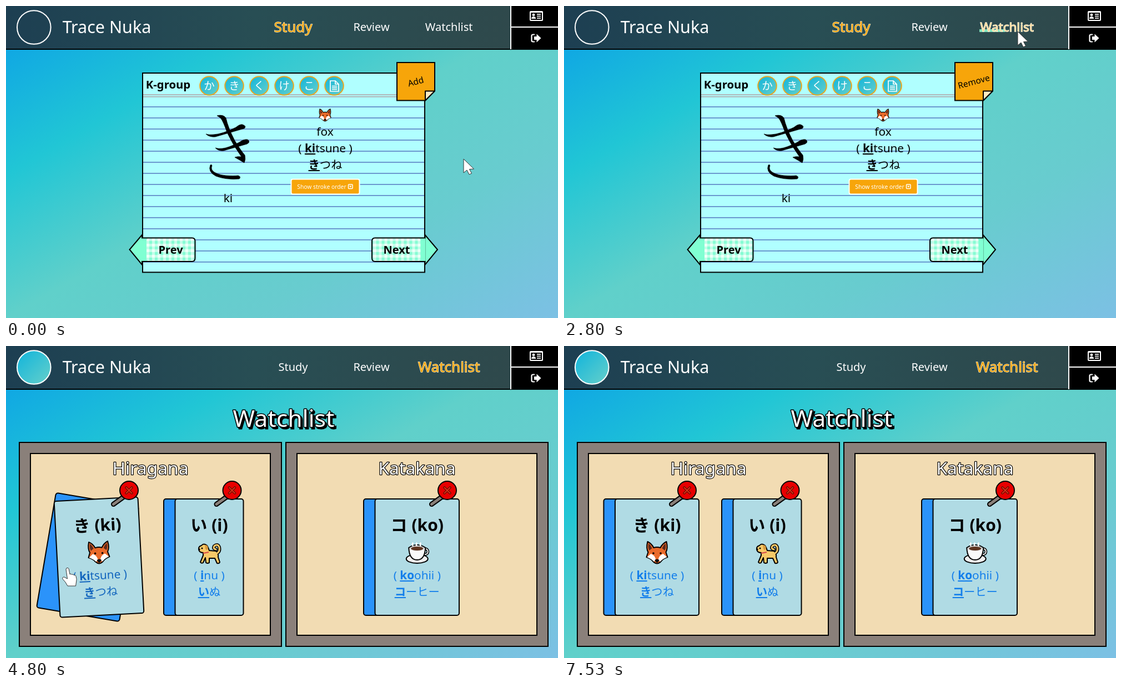
An HTML page that plays this animation: 994x563 px, repeating every 7590 ms.

```html
<!DOCTYPE html>
<html lang="en">
<head>
<meta charset="utf-8">
<title>Kana study cards</title>
<style>
  html, body { margin: 0; width: 100%; height: 100%; overflow: hidden; background: #22c6d6; }
  svg { display: block; width: 100vw; height: 100vh; }
  text { font-family: "Noto Sans", "Noto Sans CJK JP", "Noto Sans CJK", sans-serif; text-anchor: middle; }
  .b { font-weight: 700; }
  .u { font-weight: 700; text-decoration: underline; }
  .ink { stroke: #000; stroke-width: 2; }
  .outlined { fill: #fff; stroke: #000; paint-order: stroke; stroke-linejoin: round; }
</style>
</head>
<body>
<svg id="stage" viewBox="0 0 994 563" preserveAspectRatio="none"></svg>
<script>
const LOOP = 7590;
const ORANGE = '#f7a50a';

const text = (x, y, size, str, attrs = 'fill="#000"') =>
  `<text x="${x}" y="${y}" font-size="${size}" ${attrs}>${str}</text>`;
const box = (x, y, w, h, fill, attrs = '') =>
  `<rect x="${x}" y="${y}" width="${w}" height="${h}" fill="${fill}" ${attrs}/>`;
const shape = (d, fill, attrs = '') => `<path d="${d}" fill="${fill}" ${attrs}/>`;
const at = (x, y, content, extra = '') => `<g transform="translate(${x} ${y}) ${extra}">${content}</g>`;
const mirror = content => content + `<g transform="scale(-1 1)">${content}</g>`;

const defs = `<defs>
  <linearGradient id="sky" x1="0" y1="0" x2="1" y2="1">
    <stop offset="0" stop-color="#0ea0e8"/><stop offset=".07" stop-color="#10a8e3"/>
    <stop offset=".27" stop-color="#21c6d5"/><stop offset=".5" stop-color="#60d0ca"/>
    <stop offset=".72" stop-color="#68cccf"/><stop offset="1" stop-color="#7cc0e4"/>
  </linearGradient>
  <linearGradient id="bar"><stop offset="0" stop-color="#1d3f52"/><stop offset=".45" stop-color="#284e54"/>
    <stop offset="1" stop-color="#30484a"/></linearGradient>
  <linearGradient id="disc" x1="0" y1="0" x2="1" y2="1"><stop offset="0" stop-color="#10b4dc"/>
    <stop offset="1" stop-color="#66d0ca"/></linearGradient>
  <pattern id="gingham" width="10" height="10" x="253" y="419" patternUnits="userSpaceOnUse">
    <rect width="10" height="10" fill="#86fcd3"/>
    <path d="M0 0H10V5H5V10H0Z" fill="#fff" fill-opacity=".5"/>
    <path d="M0 0H5V5H0Z" fill="#fff" fill-opacity=".7"/>
  </pattern>
</defs>`;

const fox = shape('M-17-20Q-10-17-6-9Q0-11 6-9Q10-17 17-20Q20-8 16-1L19 8Q10 11 7 16Q0 23-7 16Q-10 11-19 8L-16-1Q-20-8-17-20Z',
    '#ea6b2b', 'stroke="#000" stroke-width="2" stroke-linejoin="round"') +
  mirror(shape('M18 8L11 2Q4 4 2 13L6 16Q10 11 18 8Z', '#fff') +
    shape('M15-17Q11-13 9-8L14-4Q17-10 15-17Z', '#5d2a1c') +
    '<circle cx="6.5" cy="1" r="1.8"/>') +
  shape('M-4 13Q0 10 4 13Q3 17 0 18Q-3 17-4 13Z', '#111');

const tail = (color, width) =>
  `<path d="M12 2Q20-1 18-10Q15-17 9-12Q6-7 12-6" fill="none" stroke="${color}" stroke-width="${width}" stroke-linecap="round"/>`;
const dog = tail('#000', 6) +
  shape('M-19-6Q-20-11-14-13Q-10-18-4-13Q-1-8 0-4L12-3Q17 1 16 8L19 17Q18 20 14 19L10 10L0 10L0 18Q-3 20-6 18L-7 9L-11 18Q-14 20-16 17L-11 5L-11 0Q-18 0-19-6Z',
    '#f8c968', 'stroke="#000" stroke-width="2" stroke-linejoin="round"') +
  tail('#f8c968', 3) +
  shape('M-8-14Q-2-15-2-7Q-5-3-7-7Z', '#d99a3c') +
  '<circle cx="-13" cy="-8" r="1.5"/><circle cx="-18" cy="-6" r="1.7"/>' +
  '<path d="M-11 1L-1-1" stroke="#d54848" stroke-width="2"/>';

const handle = (color, width) =>
  `<ellipse cx="15" cy="-2" rx="4.5" ry="5" fill="none" stroke="${color}" stroke-width="${width}"/>`;
const cup = '<ellipse cy="11" rx="19.5" ry="8" fill="#eee" stroke="#000" stroke-width="2"/>' +
  handle('#000', 5) + handle('#fff', 2) +
  shape('M-15-9Q-14 13 0 13Q14 13 15-9Q8-14 0-14Q-8-14-15-9Z', '#fafafa', 'stroke="#000" stroke-width="2"') +
  '<ellipse cy="-8" rx="13" ry="4.5" fill="#c9c9c9"/><ellipse cy="-7.5" rx="11" ry="3.5" fill="#5f3420"/>' +
  '<path d="M-7-12q-3-3 0-6M0-12q-3-3 0-6M7-12q-3-3 0-6" fill="none" stroke="#fff" stroke-width="2.5"/>';

const header = box(0, 0, 994, 78, 'url(#bar)') + box(0, 77, 994, 2, '#000') +
  box(908, 0, 86, 78, '#000') + box(908, 0, 2, 78, '#fff') + box(909, 37, 85, 2, '#fff') +
  '<circle id="badge" cx="50.3" cy="38.5" r="30.3" fill="url(#disc)" stroke="#fff" stroke-width="2"/>' +
  text(181.5, 49, 30.5, 'Trace Nuka', 'fill="#fff"') +
  text(517, 45, 20, 'Study', 'id="study"') +
  text(658, 45, 20, 'Review', 'fill="#fff"') +
  '<rect id="line" y="42" height="5" fill="#7fe3bd"/>' +
  text(797.7, 45, 20, 'Watchlist', 'id="watch"') +
  box(943, 9, 24, 18, '#fff', 'rx="2"') +
  shape('M945 12h20v13h-20z', '#000') +
  '<circle cx="950" cy="16" r="2.4" fill="#fff"/>' + shape('M946 23q0-4 4-4t4 4z', '#fff') +
  shape('M956 14h7v1.8h-7zM956 17.5h7v1.8h-7zM956 21h7v1.8h-7z', '#fff') +
  '<path d="M952 51.5h-3q-2.5 0-2.5 2.5v8q0 2.5 2.5 2.5h3" fill="none" stroke="#fff" stroke-width="2.2"/>' +
  shape('M951 55h4.5v-4.5l8 7.5l-8 7.5v-4.5h-4.5z', '#fff');

const arrowButton = (flip, label, x) => {
  const art = shape('M245 413L222.5 439.5L245 467Z', '#80ffd2', 'class="ink"') +
    shape('M244 418H335Q341 418 341 424V455Q341 461 335 461H244Z', '#80ffd2') +
    box(253, 419, 86, 41, 'url(#gingham)', 'rx="4"') +
    '<path d="M244 418.5H335Q340.5 418.5 340.5 424V455Q340.5 461 335 461H244" fill="none" class="ink"/>';
  return `<g ${flip ? 'transform="translate(999.5 0) scale(-1 1)"' : ''}>${art}</g>` +
    text(x, 447, 20, label, 'class="b"');
};

const kanaDiscs = [...'かきくけこ', ''].map((kana, i) => {
  const x = 366 + 45 * i;
  return `<circle cx="${x}" cy="144" r="16.8" fill="url(#disc)" stroke="#eca51e" stroke-width="2"/>` +
    (kana ? text(x, 151, 19.5, kana, 'fill="#fff"')
      : '<path d="M584 135h9l6 6v13h-15zM593 135v6h6M587 144.5h9M587 147.5h9M587 150.5h9" fill="none" stroke="#fff" stroke-width="1.7"/>');
}).join('');

const rules = Array.from({ length: 15 }, (_, i) => box(247, 181 + 20 * i, 506, 2, '#6b98cf')).join('');

const bigKi = [
  'M360 231Q366 237 377 236L429 221Q434 217 426 214Q421 213 414 219Q390 231 374 232Q365 233 360 231Z',
  'M377 256Q382 262 392 261L434 249Q441 245 435 241Q428 240 420 246Q400 256 390 257Q382 258 377 256Z',
  'M380 198Q391 195 396 202Q400 220 412 243Q423 261 430 269Q432 277 429 283Q421 278 412 273Q417 271 424 272Q408 250 398 228Q391 208 387 203Q384 200 380 198Z',
  'M368 287Q363 299 378 307Q396 314 420 312Q424 308 418 306Q410 307 396 306Q377 304 371 296Q369 292 371 288Q370 285 368 287Z'
].map(d => shape(d, '#000', 'stroke="#000" stroke-width=".7"')).join('');

const studyPage = box(246, 121, 508, 359.5, '#b0ffff', 'class="ink"') + rules +
  box(247, 159.5, 506, 1.5, '#b0a0a4') + box(247, 163, 506, 1.5, '#b0a0a4') +
  text(292, 149, 20.3, 'K-group', 'class="b"') + kanaDiscs + bigKi +
  text(400, 354, 20.8, 'ki') + at(574.5, 197, fox, 'scale(.56)') +
  text(574.5, 234, 20.8, 'fox') +
  text(575, 264, 20.8, '( <tspan class="u">ki</tspan>tsune )') +
  text(575, 294, 20.3, '<tspan class="u">き</tspan>つね') +
  box(513.5, 312.5, 123, 27, ORANGE, 'rx="3" stroke="#fff" stroke-width="2"') +
  text(568.5, 329.5, 10.3, 'Show stroke order', 'fill="#fff"') +
  box(616.5, 322, 7.5, 7.5, 'none', 'rx="1" stroke="#fff" stroke-width="1.5"') +
  shape('M618 324.5h4.5l-2.2 3z', '#fff') +
  arrowButton(false, 'Prev', 296.5) + arrowButton(true, 'Next', 703.5) +
  `<g id="note"><path id="sheet" fill="${ORANGE}" class="ink"/>` +
  shape('M755 170.5V153.5H772Z', '#fdebc2', 'id="fold" class="ink" stroke-linejoin="round"') +
  text(738, 142, 15.5, '', 'id="noteText" transform="rotate(-15 738 137)"') + '</g>';

const board = (x, label) => box(x + 1, 174, 472, 368, '#8a807a', 'class="ink"') +
  box(x + 21, 194, 432, 328, '#f2dcb3', 'class="ink"') +
  text(x + 237, 232, 31.8, label, 'class="outlined" stroke-width="2.4"');

const cards = [
  { x: 92, w: 151, pin: 221.5, title: 'き (ki)', art: fox, bold: 'ki', rest: 'tsune', kana: ['き', 'つね'] },
  { x: 304.5, w: 123, pin: 407, title: 'い (i)', art: dog, bold: 'i', rest: 'nu', kana: ['い', 'ぬ'] },
  { x: 664.5, w: 151.5, pin: 794.5, title: 'コ (ko)', art: cup, bold: 'ko', rest: 'ohii', kana: ['コ', 'ーヒー'] }
];

const line = (d, color, width) =>
  `<path d="${d}" stroke="${color}" stroke-width="${width}" stroke-linecap="round"/>`;
const needle = 'M-28 25L-10 12';
const cross = 'M-5-5L5 5M5-5L-5 5';
const pin = line(needle, '#000', 9) + line(needle, '#8a807a', 5) +
  '<circle r="16.5" fill="#e80000" class="ink"/>' +
  line(cross, '#6b0d00', 4.5) + line(cross, '#d8321a', 1.8);

const drawCard = (c, i) => {
  const leaf = fill => box(-c.w / 2, -105, c.w, 210, fill, 'rx="4" class="ink"');
  return `<g id="card${i}"><g id="back${i}">${leaf('#2b93fa')}</g><g id="front${i}">${leaf('#b0dbe4')}` +
    text(0, -47, 30, c.title, 'class="b"') + at(0, -8, c.art) +
    `<g id="words${i}">` +
    text(0, 40, 20.8, `( <tspan class="u">${c.bold}</tspan>${c.rest} )`, '') +
    text(0, 70, 20.3, `<tspan class="u">${c.kana[0]}</tspan>${c.kana[1]}`, '') + '</g></g></g>' +
    at(c.pin, 260.5, pin);
};

const listPage = text(503, 149, 42.7, 'Watchlist', 'stroke="#000" stroke-width="3"') +
  text(500, 146, 42.7, 'Watchlist', 'class="outlined" stroke-width="3"') +
  board(23, 'Hiragana') + board(503, 'Katakana') + cards.map(drawCard).join('');

const pointer = '<g id="cursor" stroke="#333" stroke-linejoin="round">' +
  shape('M0 0V25L6 20L10 28L14.5 26L10.5 18.5L18.5 18Z', '#fff', 'id="arrow"') +
  shape('M-3 2Q-2.5-1 0-.7Q2-.3 2.3 2L4 11Q6 9 7.5 11.5Q9.5 10 11.5 12.5Q14 11 15 14.5Q17 20 15.5 25L14.5 32L0 32Q-4 24-9 19.5Q-10 15.5-6 16L-.5 19Z',
    '#fff', 'id="hand"') + '</g>';

const stage = document.getElementById('stage');
stage.innerHTML = defs + box(0, 0, 994, 563, 'url(#sky)') + header +
  `<g id="studyPage">${studyPage}</g><g id="listPage">${listPage}</g>` + pointer;

const el = id => document.getElementById(id);
const set = (id, attrs) => { for (const k in attrs) el(id).setAttribute(k, attrs[k]); };
const show = (id, on) => set(id, { display: on ? 'inline' : 'none' });
const ramp = (t, start, length) => Math.min(1, Math.max(0, (t - start) / length));
const easeOut = p => 1 - (1 - p) ** 2;
const smooth = p => p * p * (3 - 2 * p);
const mix = (a, b, p) => a + (b - a) * p;
const tint = (a, b, p) => `rgb(${a.map((v, i) => Math.round(mix(v, b[i], p)))})`;
const hover = (t, enter, leave, length = 500) =>
  easeOut(ramp(t, enter, length)) * (1 - easeOut(ramp(t, leave, length)));

// time, x, y of the pointer tip
const route = [
  [130, 824, 276], [800, 803, 250], [1450, 742, 140], [1700, 742, 137], [2130, 742, 137], [2400, 780, 100],
  [2800, 817, 46], [3000, 819, 41], [3930, 820, 42], [4650, 113, 398], [4800, 111, 401],
  [5700, 111, 401], [6130, 328, 358], [6400, 350, 335], [7100, 470, -40]
];
function pointerAt(t) {
  const i = route.findIndex(p => p[0] > t);
  if (i === 0) return route[0].slice(1);
  if (i < 0) return route[route.length - 1].slice(1);
  const [a, b] = [route[i - 1], route[i]];
  const p = smooth((t - a[0]) / (b[0] - a[0]));
  return [mix(a[1], b[1], p), mix(a[2], b[2], p)];
}

function navItem(id, grown, stroked) {
  set(id, {
    'font-size': mix(20, 26, grown), y: mix(45, 47, grown),
    fill: tint([255, 255, 255], [247, 165, 10], grown),
    stroke: tint([255, 255, 255], [255, 240, 205], grown),
    'stroke-width': stroked ? 1.3 : 0, 'paint-order': 'stroke'
  });
}

function glow(id, strength) {
  el(id).style.filter = strength > 0.02 ? `drop-shadow(0 0 ${5 * strength}px rgba(255,160,0,${strength}))` : 'none';
}

function render(t) {
  const listing = t >= 3800;
  show('studyPage', !listing);
  show('listPage', listing);

  set('badge', { 'fill-opacity': ramp(t, 3330, 270) });
  navItem('study', listing ? 0 : 1, !listing);
  const grown = listing ? easeOut(ramp(t, 3790, 400)) : easeOut(ramp(t, 2730, 300));
  navItem('watch', grown, listing || grown > 0);
  const underline = listing ? hover(t, 3793, 4130, 350) : easeOut(ramp(t, 2730, 300));
  set('line', { width: 113 * underline, x: mix(753, 741, grown) });

  const onNote = t >= 1400 && t < 2270;
  set('sheet', { d: onNote ? 'M704 102H772V170.5H704Z' : 'M704 102H772V153L755 170.5H704Z' });
  show('fold', !onNote);
  el('noteText').textContent = t < 1800 ? 'Add' : 'Remove';
  glow('note', hover(t, 1400, 2270, 300));

  const lifts = [hover(t, 4600, 6110), hover(t, 6130, 6330), 0];
  cards.forEach((c, i) => {
    const mid = c.x + c.w / 2;
    set('back' + i, { transform: `translate(${mid - 20.5} 381) rotate(${15 * lifts[i]})` });
    set('front' + i, { transform: `translate(${mid} 381) rotate(${-4.7 * lifts[i]})` });
    set('words' + i, { fill: tint([18, 126, 235], [20, 88, 165], lifts[i]) });
  });
  glow('card0', hover(t, 4800, 6130));

  const [x, y] = pointerAt(t);
  const hand = (t >= 1450 && t < 2230) || (t >= 3800 && t < 4100) || (t >= 4650 && t < 6500);
  set('cursor', { transform: `translate(${x} ${y})` });
  show('arrow', !hand);
  show('hand', hand);
}

// The picture advances in alternating steps of 130 and 70 ms.
const step = t => Math.floor(t / 200) * 200 + (t % 200 >= 130 ? 130 : 0);

const start = performance.now();
function tick() {
  render(step((performance.now() - start) % LOOP));
  requestAnimationFrame(tick);
}
tick();
</script>
</body>
</html>
```
